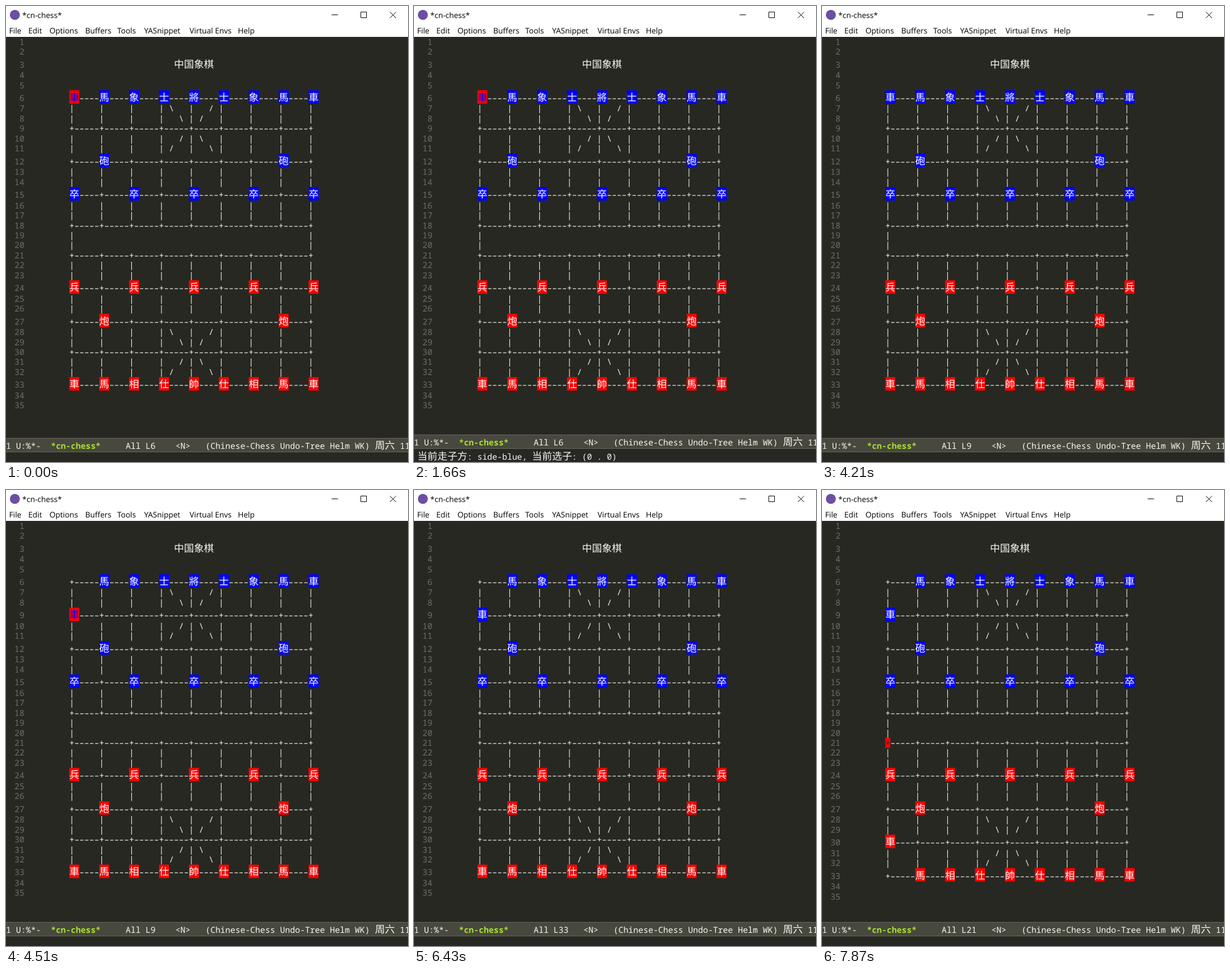
An HTML page for the animation above (7.99 s loop, 703x797 px).

```html
<!DOCTYPE html>
<html lang="zh-CN">
<head>
<meta charset="utf-8">
<title>cn-chess</title>
<style>
  html, body { margin: 0; width: 100%; height: 100%; overflow: hidden; background: #272822; }
  svg { display: block; position: absolute; left: 0; top: 0; }
  text { white-space: pre; text-rendering: geometricPrecision; fill: #f8f8f2; }
  .mono { font: 14.53px "Noto Sans Mono", "DejaVu Sans Mono", monospace; }
  .bold { font-weight: bold; }
  .cjk { font: 17.44px "Noto Sans CJK SC", "Noto Sans CJK", "Noto Sans CJK JP", sans-serif; }
  .ui { font: 13.5px "Open Sans", "Noto Sans", sans-serif; fill: #000; }
</style>
</head>
<body>
<svg id="stage" width="703" height="797" viewBox="0 0 703 797"></svg>
<script>
const W = 703, H = 797, LOOP = 7990;
const CW = 8.718, ROW = 17.44, TALL = 23.54, DROP = 5, ASC = 13.7;
const LEFT = 6.1, TOP = 53.95, BOARD = LEFT + 12 * CW;
const BG = '#272822', RED = '#ff0000', BLUE = '#0000ff', WHITE = '#ffffff';

// [ms, cursor line, cursor shown, moves done, echo text]
const blue = '当前走子方: side-blue, 当前选子: (0 . 0)';
const red = '当前走子方: side-red, 当前选子: (9 . 0)';
const wrong = 'SPC j is undefined';
const steps = [
  [0, 6, 1, 0, ''],
  [150, 6, 0, 0, ''],
  [740, 6, 1, 0, ''],
  [1040, 6, 1, 0, 'SPC-'],
  [1190, 6, 0, 0, 'SPC-'],
  [1340, 6, 1, 0, wrong],
  [1660, 6, 1, 0, blue],
  [2250, 6, 0, 0, blue],
  [2710, 6, 1, 0, blue],
  [3300, 6, 0, 0, blue],
  [3740, 9, 1, 0, ''],
  [4210, 9, 0, 0, ''],
  [4510, 9, 1, 1, ''],
  [4950, 12, 1, 1, ''],
  [5540, 9, 1, 1, ''],
  [5700, 6, 1, 1, ''],
  [6000, 33, 1, 1, ''],
  [6430, 33, 0, 1, ''],
  [6580, 33, 1, 1, red],
  [7020, 30, 1, 1, ''],
  [7300, 30, 1, 2, ''],
  [7600, 27, 1, 2, ''],
  [7730, 24, 1, 2, ''],
  [7870, 21, 1, 2, '']
];

const setup = {
  6: '車馬象士將士象馬車',
  12: ' 砲     砲 ',
  15: '卒 卒 卒 卒 卒',
  24: '兵 兵 兵 兵 兵',
  27: ' 炮     炮 ',
  33: '車馬相仕帥仕相馬車'
};

const esc = s => s.replace(/&/g, '&amp;').replace(/</g, '&lt;');
const text = (x, y, s, cls = 'mono', fill = '') =>
  `<text x="${x.toFixed(2)}" y="${y.toFixed(2)}" class="${cls}"${fill && ` style="fill:${fill}"`}>${esc(s)}</text>`;
const box = (x, y, w, h, fill) =>
  `<rect x="${x.toFixed(2)}" y="${y.toFixed(2)}" width="${w}" height="${h}" fill="${fill}"/>`;

// Mixed run: wide characters take two columns
function run(x, y, s) {
  let out = '';
  for (const part of s.match(/[\u4e00-\u9fff]+|[^\u4e00-\u9fff]+/g) || []) {
    const wide = part > '\u4dff';
    out += text(x, y, part, wide ? 'cjk' : 'mono');
    x += part.length * CW * (wide ? 2 : 1);
  }
  return out;
}

function position(moves) {
  const p = { ...setup };
  const step = (from, to) => {
    p[to] = p[from][0];
    p[from] = ' ' + p[from].slice(1);
  };
  if (moves > 0) step(6, 9);
  if (moves > 1) step(33, 30);
  return p;
}

function put(chars, marks) {
  for (const [col, c] of marks) chars[col] = c;
}

// Grid characters of one buffer line, without pieces
function gridLine(n) {
  if (n < 6 || n > 33) return '';
  if (n % 3 === 0) return '+–––––'.repeat(8) + '+';
  if (n === 19 || n === 20) return '|' + ' '.repeat(47) + '|';
  const c = [...('|     '.repeat(8) + '|')];
  const k = n < 12 ? n - 6 : n > 27 ? n - 27 : 0;
  if (k === 1) put(c, [[20, '\\'], [28, '/']]);
  if (k === 2) put(c, [[22, '\\'], [26, '/']]);
  if (k === 4) put(c, [[22, '/'], [26, '\\']]);
  if (k === 5) put(c, [[20, '/'], [28, '\\']]);
  return c.join('');
}

function piece(x, top, glyph, back, ink) {
  return box(x, top, 2 * CW, TALL, back) + text(x, top + DROP + ASC, glyph, 'cjk', ink);
}

function buffer(line, shown, moves) {
  const pos = position(moves);
  let out = '', top = TOP;
  for (let n = 1; n <= 35; n++) {
    const men = pos[n] || '';
    const tall = n === 3 || men;
    const textTop = top + (tall ? DROP : 0), base = textTop + ASC;
    out += text(LEFT + CW, base, String(n).padStart(2), 'mono', '#6e6e64');
    if (n === 3) out += text(BOARD + 21 * CW, base, '中国象棋', 'cjk');

    const grid = [...gridLine(n)];
    const here = shown && n === line;
    let over = '';
    [...men].forEach((m, i) => {
      if (m === ' ') return;
      put(grid, [[i * 6, ' '], [i * 6 + 1, ' ']]);
      const side = n < 19 ? BLUE : RED;
      let back = side, ink = WHITE;
      if (here && i === 0) [back, ink] = side === RED ? [WHITE, RED] : [RED, BLUE];
      over += piece(BOARD + i * 6 * CW, top, m, back, ink);
    });
    if (here && grid[0] === '+') {
      grid[0] = ' ';
      over += box(BOARD, textTop, CW, ROW, RED) + text(BOARD, base, '+', 'mono', BG);
    }
    out += text(BOARD, base, grid.join('')) + over;
    top += tall ? TALL : ROW;
  }
  return out;
}

function modeline(line, echo) {
  const wide = /[\u4e00-\u9fff]/.test(echo);
  const top = wide ? 749 : 755, base = top + 19.3;
  const at = (col, s) => run(col * CW, base, s);
  return box(0, top, W, 25, '#64645e') + box(0, top + 1, W, 23, '#49483e') +
    at(0, '1 U:%*-') +
    text(9 * CW, base, '*cn-chess*', 'mono bold', '#a6e22e') +
    at(24, 'All L' + line) + at(34, '<N>') +
    at(40, '(Chinese-Chess Undo-Tree Helm WK) 周六 11') +
    run(LEFT, wide ? 793 : 794, echo);
}

function frame() {
  const menu = [[5.5, 'File'], [39, 'Edit'], [76, 'Options'], [138.5, 'Buffers'],
    [194.5, 'Tools'], [241.5, 'YASnippet'], [321, 'Virtual Envs'], [405.5, 'Help']];
  return box(0, 0, W, H, BG) + box(0, 0, W, 54, WHITE) +
    '<circle cx="15.5" cy="15.5" r="8.7" fill="#6a4fa3"/>' +
    text(28.5, 21, '*cn-chess*', 'ui') +
    '<path d="M569.5 15.5h11M620.5 10.5h10v10h-10zM671.5 10.5l10.5 10.5M682 10.5l-10.5 10.5" fill="none" stroke="#000"/>' +
    menu.map(([x, s]) => text(x, 48, s, 'ui')).join('');
}

const stage = document.getElementById('stage');
stage.innerHTML = `<g>${frame()}</g><g id="live"></g>`;
const live = document.getElementById('live');
const start = performance.now();
let current = null;

function draw() {
  const t = (performance.now() - start) % LOOP;
  const step = steps.findLast(s => s[0] <= t);
  if (step !== current) {
    current = step;
    const [, line, shown, moves, echo] = step;
    live.innerHTML = buffer(line, shown, moves) + modeline(line, echo);
  }
  requestAnimationFrame(draw);
}
draw();
</script>
</body>
</html>
```
